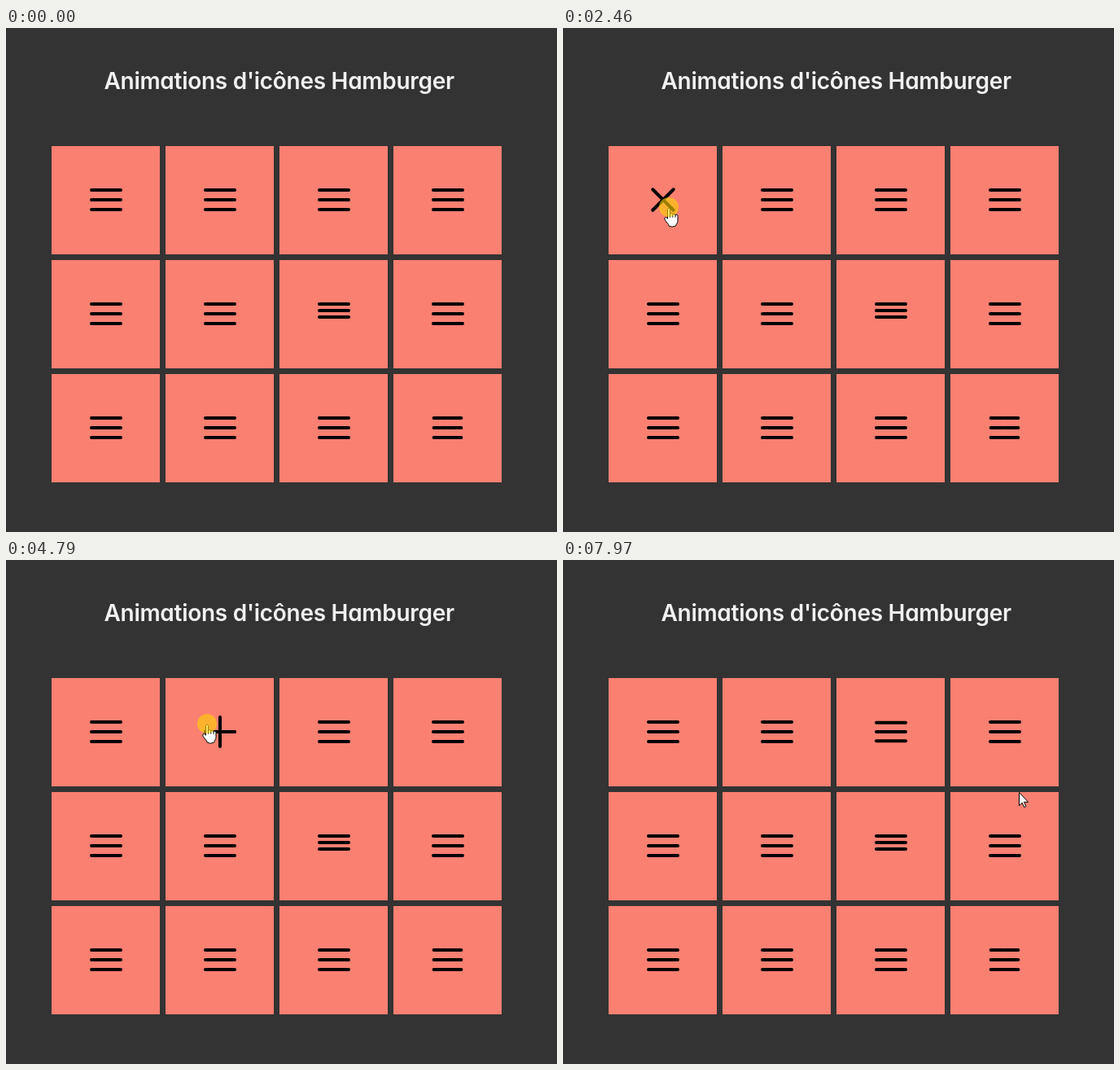
Recreate the animation shown at these times as an HTML page. Size 677 by 619 pixels, loop 8 s.

```html
<!DOCTYPE html>
<html lang="fr">
<head>
<meta charset="utf-8">
<title>Animations d'icônes Hamburger</title>
<style>
  html, body { margin: 0; width: 100%; height: 100%; overflow: hidden; background: #333; }
  svg { display: block; }
  .title {
    font: 600 28px Inter, "Open Sans", sans-serif;
    font-feature-settings: "cv11";
    letter-spacing: -.28px;
    fill: #f1f1f1;
    text-anchor: middle;
  }
  .bar { transform-box: fill-box; transform-origin: center; }
  .cursor { fill: #fff; stroke: #000; stroke-linejoin: round; }
</style>
</head>
<body>
<svg width="677" height="619" viewBox="0 0 677 619">
  <text class="title" x="335.7" y="75">Animations d'icônes Hamburger</text>
  <g id="grid"></g>
  <g id="pointer">
    <path id="arrow" class="cursor" d="M.5 .5V16.7L4.2 13.2L6.6 18.6L8.9 17.6L6.5 12.3H11.5Z"/>
    <g id="hand" class="cursor" transform="translate(0 .7)">
      <path d="M-1.5 13.5V2.2C-1.5 .2 1.6 .2 1.6 2.2V8C1.8 6.4 4.8 6.5 4.8 8.5C5 7 8 7.2 8 9.2C8.4 8 11 8.2 11 10.2V16C11 19 9 20 8.6 22.3Q4 24.8 0 22.3C0 20 -2.5 18.5 -5 14.5C-6 12.5 -4 11.2 -2.8 12.2Z"/>
      <path fill="none" d="M1.6 8V12M4.8 8.5V12M8 9.2V12"/>
    </g>
    <circle id="click" r="12" fill="#ffd400" fill-opacity=".6"/>
  </g>
</svg>
<script>
const LOOP = 8000, FADE = 600, PRESS = 70, PITCH = 140;
const $ = id => document.getElementById(id);

function add(parent, tag, attrs) {
  const el = document.createElementNS('http://www.w3.org/2000/svg', tag);
  for (const k in attrs) el.setAttribute(k, attrs[k]);
  parent.appendChild(el);
  return el;
}

// One tile with three bars; the last tile has bars made of two halves.
function tile(i) {
  const x = 56 + i % 4 * PITCH, y = 145 + Math.floor(i / 4) * PITCH;
  add($('grid'), 'rect', { x, y, width: 133, height: 133, fill: 'salmon' });
  const gap = i === 6 ? 8 : 12;
  const parts = i === 11 ? [[47.6, 20], [65.4, 20]] : [[47, 40]];
  return [0, 1, 2].map(n => {
    const g = add($('grid'), 'g', { class: 'bar' });
    for (const [dx, width] of parts)
      add(g, 'rect', { x: x + dx, y: y + 52 + n * gap, width, height: 4, rx: 2 });
    return g;
  });
}
const tiles = Array.from({ length: 12 }, (_, i) => tile(i));

// Where the pointer arrives and when; some stops end in a click.
const stop = (t, x, y, click = false) => ({ t, x, y, click });
const stops = [
  stop(70, 468, 472),
  stop(850, 136, 208, true),
  stop(1800, 130, 227),
  stop(2140, 130, 234),
  stop(2390, 130, 220, true),
  stop(3160, 195, 267),
  stop(3550, 250, 214, true),
  stop(4600, 204, 233),
  stop(4720, 247, 201, true),
  stop(5240, 300, 259),
  stop(5715, 400, 203, true),
  stop(6390, 346, 237),
  stop(7170, 379, 200),
  stop(7350, 389, 210, true),
  stop(7960, 560, 285)
];
const clicks = stops.filter(s => s.click).map(s => s.t + PRESS);

const smooth = u => u * u * (3 - 2 * u);
const clamp = u => Math.min(1, Math.max(0, u));

// cubic-bezier(.42, 0, .58, 1)
function ease(x) {
  let lo = 0, hi = 1;
  for (let i = 0; i < 24; i++) {
    const s = (lo + hi) / 2, r = 1 - s;
    if (1.26 * r * r * s + 1.74 * r * s * s + s * s * s < x) lo = s; else hi = s;
  }
  return smooth(lo);
}

// Rest at each stop, then travel for a time that grows with the distance.
function pointerAt(t) {
  const i = stops.findIndex(s => s.t > t);
  if (i < 1) return i ? stops[stops.length - 1] : stops[0];
  const a = stops[i - 1], b = stops[i];
  const dx = b.x - a.x, dy = b.y - a.y;
  const time = Math.min(b.t - a.t, 230 + 1.2 * Math.hypot(dx, dy));
  const k = smooth(clamp(1 - (b.t - t) / time));
  return { x: Math.round(a.x + dx * k), y: Math.round(a.y + dy * k) };
}

const place = (el, x, y, angle = 0) => {
  el.style.transform = `translate(${x}px, ${y}px) rotate(${angle}deg)`;
};

// Open poses, p from 0 (closed) to 1 (open): cross, plus, minus
const poses = [
  ([top, mid, low], p) => {
    place(top, 0, 12 * p, 135 * p);
    place(mid, -13 * p, 0);
    mid.style.opacity = 1 - p;
    place(low, 0, -12 * p, -135 * p);
  },
  ([top, , low], p) => {
    place(top, 0, 12 * p);
    place(low, 0, -12 * p, 90 * p ** 1.6);
  },
  ([top, , low], p) => {
    place(top, 0, 12 * p);
    place(low, 0, -12 * p);
  }
];

const show = (id, on) => $(id).setAttribute('visibility', on ? 'visible' : 'hidden');

function draw(t) {
  const moved = clicks.map(c => ease(clamp((t - c - 60) / FADE)));
  poses.forEach((pose, i) => pose(tiles[i], moved[2 * i] - moved[2 * i + 1]));

  const { x, y } = pointerAt(t);
  $('pointer').setAttribute('transform', `translate(${x} ${y})`);
  const col = (x - 103) % PITCH, row = (y - 197) % PITCH;
  const over = col >= 0 && col <= 40 && row >= 0 && row <= 28;
  const here = t >= stops[0].t;
  show('hand', here && over);
  show('arrow', here && !over);
  show('click', clicks.some(c => t >= c && t < c + 150));
}

function tick() {
  draw(performance.now() % LOOP);
  requestAnimationFrame(tick);
}
tick();
</script>
</body>
</html>
```
